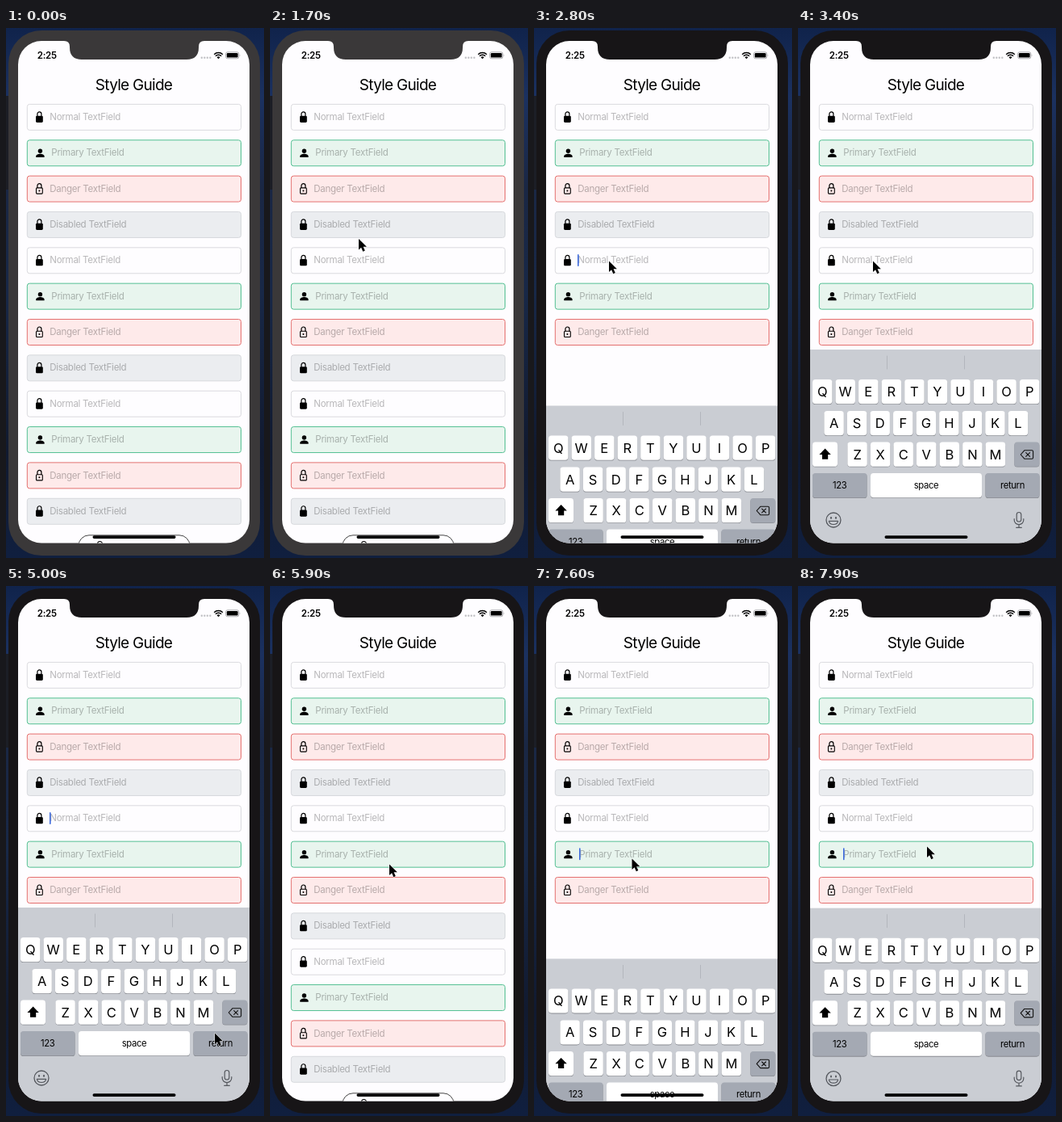
An HTML page that plays this animation: 320x656 px, repeating every 8000 ms.

```html
<!DOCTYPE html>
<html lang="en">
<head>
<meta charset="utf-8">
<title>Style Guide</title>
<style>
  html, body { margin: 0; width: 100%; height: 100%; overflow: hidden; background: #10203f; }
  svg { display: block; width: 320px; height: 656px; font-family: Inter, Roboto, sans-serif; }
  .hint { font-size: 11.5px; letter-spacing: -.26px; fill: #000; fill-opacity: .28; }
  .letter { font-size: 16.5px; text-anchor: middle; }
  .word { font-size: 11.3px; letter-spacing: -.35px; text-anchor: middle; }
  .line { fill: none; stroke-linecap: round; stroke-linejoin: round; }
</style>
</head>
<body>
<svg id="stage" viewBox="0 0 320 656"></svg>
<script>
const LOOP = 8000, KB_HEIGHT = 240;
const FOCUS = 2600, OPEN_1 = 2665, CLOSE = 5300, OPEN_2 = 7458;

const rect = (x, y, w, h, r, fill, more = '') =>
  `<rect x="${x}" y="${y}" width="${w}" height="${h}" rx="${r}" fill="${fill}" ${more}/>`;
const path = (d, more = '') => `<path d="${d}" ${more}/>`;
const line = (d, color, width) => path(d, `class="line" stroke="${color}" stroke-width="${width}"`);
const text = (x, y, cls, s) => `<text x="${x}" y="${y}" class="${cls}">${s}</text>`;

// Icons are drawn around the middle of a field.
const shackle = line('M38.9 -1.5v-2.3a2.5 2.7 0 0 1 5 0v2.3', '#000', 1.2);
const icons = {
  lock: rect(37, -1.7, 8.8, 8.2, 1.4, '#000') + shackle,
  person: '<circle cx="42.4" cy="-2.5" r="2.7"/>' +
    path('M37.2 5.2v-1.3c0-2 3-3 5.2-3s5.2 1 5.2 3v1.3z'),
  openLock: rect(37.5, -1.2, 7.8, 7.2, 1, 'none', 'stroke="#000" stroke-width="1.1"') +
    shackle + '<circle cx="41.4" cy="2.4" r="1"/>'
};

const styles = [
  ['Normal', '#fefdff', '#dadade', 'lock', 54.3],
  ['Primary', '#e8f5ee', '#53bf92', 'person', 56.3],
  ['Danger', '#feeaea', '#e4706f', 'openLock', 54.3],
  ['Disabled', '#ebedf0', '#d6d8dc', 'lock', 54.3]
];

function field(i) {
  const [name, fill, border, icon, x] = styles[i % 4];
  return `<g transform="translate(0 ${110.4 + i * 44.35})">` +
    rect(26.3, -16, 265.2, 32, 3, fill, `stroke="${border}"`) +
    icons[icon] + text(x, 3.6, 'hint', name + ' TextField') + '</g>';
}
const fields = (from, to) =>
  Array.from({ length: to - from }, (_, i) => field(from + i)).join('');

const key = (x, y, w, fill = '#fff') =>
  rect(x, y - 14.2, w, 30.2, 3.6, '#898c92') + rect(x, y - 15, w, 30.2, 3.6, fill);
const letters = (s, x, y) => [...s].map((c, i) => {
  const cx = x + i * 28.55;
  return key(cx - 12.2, y, 24.4) + text(cx, y + 6, 'letter', c);
}).join('');

const gray = '#a4a9b3', ink = '#55585e';
const keyboard =
  rect(15, 398, 287, 250, 0, '#cacdd3') +
  line('M110.5 406v16M206.5 406v16', '#b3b6bd', 1) +
  letters('QWERTYUIOP', 30.2, 450) +
  letters('ASDFGHJKL', 44.6, 489) +
  letters('ZXCVBNM', 73.6, 527.6) +
  key(18, 527.6, 31) +
  path('M33.6 520.5l7.2 7.4h-3.6v5.8h-7.2v-5.8h-3.6z') +
  key(268.3, 527.6, 31, gray) +
  line('M276.2 528l4.6-5.2h9.4q1.4 0 1.4 1.4v7.6q0 1.4-1.4 1.4h-9.4z', '#111', 1.1) +
  line('M282.7 525.6l4.8 4.8M287.5 525.6l-4.8 4.8', '#111', 1.1) +
  key(18, 566, 67.6, gray) + text(51.8, 570, 'word', '123') +
  key(90, 566, 138, '#fff') + text(159, 570, 'word', 'space') +
  key(232.4, 566, 67, gray) + text(266, 570, 'word', 'return') +
  `<circle cx="44" cy="609" r="9" fill="none" stroke="${ink}" stroke-width="1.3"/>` +
  `<ellipse cx="41" cy="606.3" rx="1" ry="1.5" fill="${ink}"/>` +
  `<ellipse cx="47" cy="606.3" rx="1" ry="1.5" fill="${ink}"/>` +
  line('M38.3 610.4h11.4a5.8 5 0 0 1-11.4 0z', ink, 1.1) +
  rect(271.2, 599.5, 5.6, 11.5, 2.8, 'none', `stroke="${ink}" stroke-width="1.2"`) +
  line('M268.2 607.5v1.5a5.8 5.6 0 0 0 11.6 0v-1.5M274 614.6v3.6M270.7 618.3h6.6', ink, 1.2);

const status =
  '<text x="38.8" y="38" font-size="11.5" font-weight="600" letter-spacing="-.3">2:25</text>' +
  [242.8, 246.3, 249.8, 253.3].map(x => `<circle cx="${x}" cy="36.8" r="1.2" fill="#c2c2c6"/>`).join('') +
  path('M263.5 38.2l-2-2a2.8 2.8 0 0 1 4 0z') +
  path('M259.9 34.7a5.1 5.1 0 0 1 7.2 0M258.2 32.7a7.5 7.5 0 0 1 10.6 0',
    'fill="none" stroke="#000" stroke-width="1.5"') +
  rect(272.6, 29.8, 16.2, 8, 2.2, 'none', 'stroke="#98989c" stroke-width=".8"') +
  rect(273.8, 31, 13.8, 5.6, 1.2, '#000') +
  path('M289.8 32.4q1.3 1.4 0 2.8z', 'fill="#98989c"');

stage.innerHTML = `
  <defs>
    <linearGradient id="desk" x2="0" y2="1">
      <stop offset="0" stop-color="#10234b"/><stop offset=".13" stop-color="#1b3160"/>
      <stop offset=".3" stop-color="#1a2744"/><stop offset=".5" stop-color="#182847"/>
      <stop offset=".8" stop-color="#111a30"/><stop offset="1" stop-color="#101f3f"/>
    </linearGradient>
    <clipPath id="screen">${rect(15, 16, 287, 621.5, 29, '#000')}</clipPath>
  </defs>
  ${rect(0, 0, 320, 656, 0, 'url(#desk)')}
  ${rect(0, 84, 4, 116, 0, '#1c1e26')}
  <g id="bezel">${rect(3, 3, 312, 650, 41, 'inherit').replace('fill="inherit"', '')}</g>
  <g clip-path="url(#screen)">
    ${rect(15, 16, 287, 622, 0, '#fefdff')}
    <text x="110.8" y="76.6" font-size="19" letter-spacing="-.72">Style Guide</text>
    ${fields(0, 7)}
    <g id="lower">${fields(7, 12)}
      ${rect(90, 627.8, 138, 32, 13, '#fefdff', 'stroke="#333" stroke-width=".9"')}
      ${line('M113.5 640v-1.5a3 3 0 0 1 6 0v1.5', '#000', 1.1)}
    </g>
    ${rect(0, 0, 1.6, 15, .8, '#3c69dd', 'id="caret"')}
    <g id="keys">${keyboard}</g>
    ${rect(107.5, 628.2, 103, 3.8, 1.9, '#000')}
    ${status}
  </g>
  ${path('M72 15v1q7 0 7 7v1q0 15 15 15h130q15 0 15-15v-1q0-7 7-7v-1z', 'id="notch"')}
  <g id="pointer">${path('M0 0v13.6l3.1-2.9 2.2 5 2.5-1.1-2.2-4.9h4.3z',
    'stroke="#fff" stroke-width="1" stroke-linejoin="round" paint-order="stroke"')}</g>`;

const $ = id => document.getElementById(id);
const show = (el, on) => el.setAttribute('display', on ? 'inline' : 'none');
const move = (el, x, y) => el.setAttribute('transform', `translate(${x} ${y})`);

// Pointer stops: time, x, y.
const route = [
  [1200, -10, 330], [1650, 110, 261], [2000, 110, 261], [2450, 93, 288.5],
  [3500, 93, 288.5], [4500, 259, 553.5], [5400, 259, 553.5], [5880, 148, 344.5],
  [6800, 148, 344.5], [7300, 121.5, 337.5], [7600, 121.5, 337.5], [7880, 160, 322.5]
];

function pointerAt(t) {
  const n = route.findIndex(p => p[0] > t);
  if (n < 1) return (n ? route[route.length - 1] : route[0]).slice(1);
  const [t0, x0, y0] = route[n - 1], [t1, x1, y1] = route[n];
  const u = (t - t0) / (t1 - t0), e = u * u * (3 - 2 * u);
  return [x0 + (x1 - x0) * e, y0 + (y1 - y0) * e];
}

// Remaining share of a critically damped spring.
const spring = ms => (1 + .0183 * ms) * Math.exp(-.0183 * ms);

function keyboardOffset(t) {
  if (t < OPEN_1) return KB_HEIGHT;
  if (t < CLOSE) return KB_HEIGHT * spring(t - OPEN_1);
  if (t < OPEN_2) return KB_HEIGHT * (1 - spring(t - CLOSE));
  return KB_HEIGHT * spring(t - OPEN_2);
}

function draw(t) {
  const first = t >= OPEN_1 && t < CLOSE, second = t >= OPEN_2;
  const color = t < FOCUS ? '#3a3839' : '#171517';
  $('bezel').setAttribute('fill', color);
  $('notch').setAttribute('fill', color);

  show($('lower'), !first && !second);
  const offset = keyboardOffset(t);
  show($('keys'), offset < KB_HEIGHT - .5);
  move($('keys'), 0, offset);

  const since = t - (second ? OPEN_2 : OPEN_1);
  show($('caret'), (first || second) && since % 1000 < 550);
  move($('caret'), second ? 56 : 54, second ? 324.3 : 280);

  show($('pointer'), t > route[0][0]);
  move($('pointer'), ...pointerAt(t));
}

const start = performance.now();
function tick() {
  draw((performance.now() - start) % LOOP);
  requestAnimationFrame(tick);
}
tick();
</script>
</body>
</html>
```
